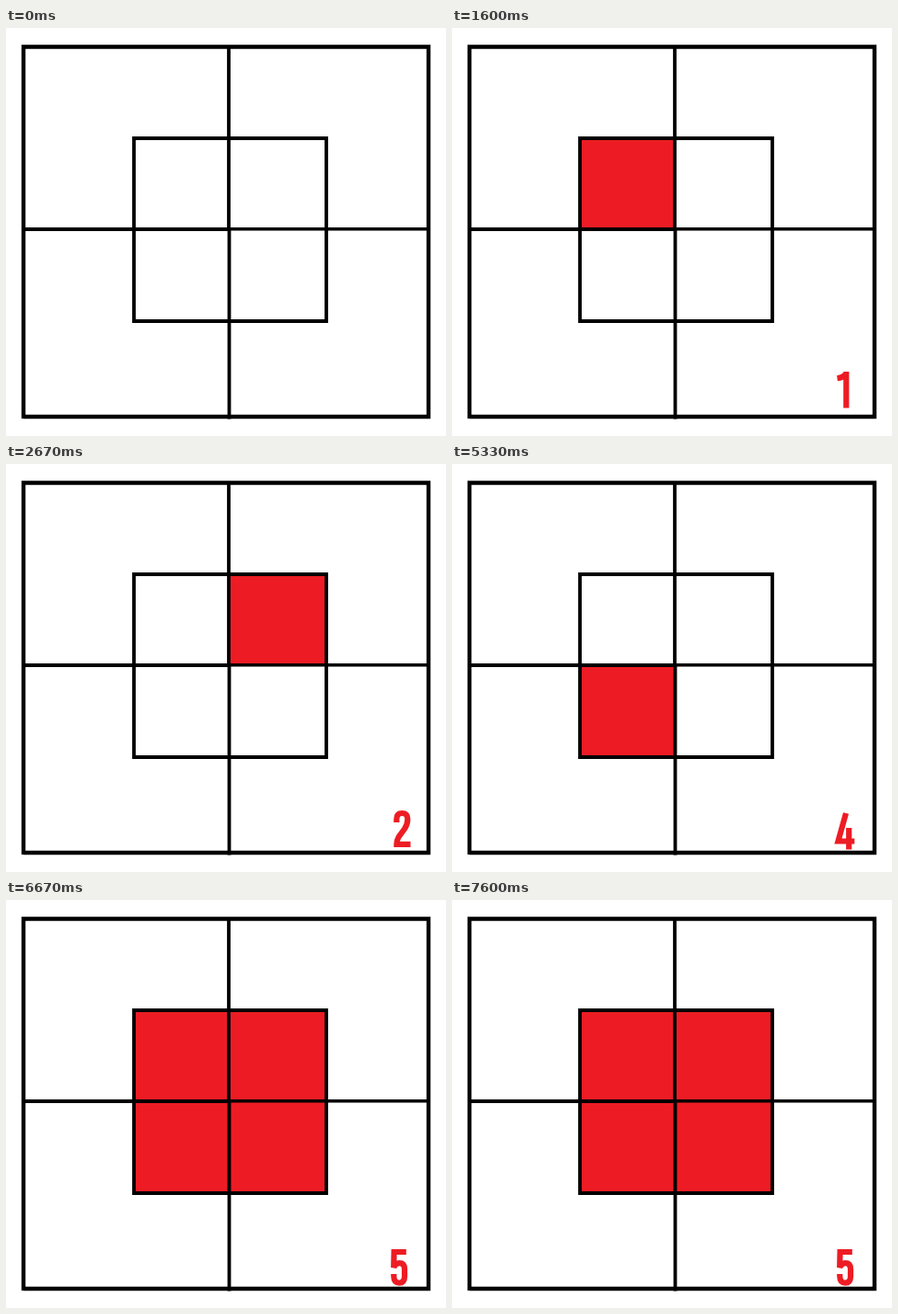
An HTML page that plays this animation: 478x444 px, repeating every 8 s.

```html
<!DOCTYPE html>
<html lang="en">
<head>
<meta charset="utf-8">
<title>Quadrants</title>
<style>
  html, body { margin: 0; width: 100%; height: 100%; overflow: hidden; background: #fff; }
  svg { display: block; width: 478px; height: 444px; }
  .line { fill: none; stroke: #000; stroke-width: 4; }
  .cell { fill: #ed1c24; }
  #digit { fill: none; stroke: #ed1c24; stroke-width: 6.2; }
</style>
</head>
<body>
<svg viewBox="0 0 478 444" role="img">
  <g id="cells"></g>
  <g class="line">
    <path d="M19 425V20.5H459V423H19" stroke-width="4.4"/>
    <path d="M242 20V219" stroke-width="3.8"/>
    <path d="M242.5 219V425.5" stroke-width="3.8"/>
    <path d="M19 219H242" stroke-width="4.2"/>
    <path d="M242 218.8H459" stroke-width="3.6"/>
    <path d="M139 120H348V319H139Z" stroke-width="3.8"/>
  </g>
  <path id="digit"/>
</svg>
<script>
const LOOP = 8000;
const svg = document.querySelector('svg');
const digit = document.getElementById('digit');

// Condensed numerals drawn as strokes, clockwise cells starting top left.
const steps = [
  { at: 0, label: '', lit: [], glyph: '' },
  { at: 1330, label: '1', lit: [0],
    glyph: 'M428.3 413.5V374M428.5 376.5Q424.5 380.5 418.5 381.3' },
  { at: 2670, label: '2', lit: [1],
    glyph: 'M424.3 390V386.5Q424.3 380 430.3 380T436.3 386.5Q436.3 392 433 397L426.5 406Q424.4 409.5 424.4 413.8H439.5' },
  { at: 4070, label: '3', lit: [2],
    glyph: 'M425.3 389.5V387Q425.3 381 431 381T436.7 387V390.5Q436.7 396.7 431 396.7H428.5M431 396.7Q437 396.7 437 403V408.5Q437 415 431 415T425.3 408.5V405.5' },
  { at: 5330, label: '4', lit: [3],
    glyph: 'M428 380L419.5 410.5H437.3M431.2 396V419.5' },
  { at: 6670, label: '5', lit: [0, 1, 2, 3],
    glyph: 'M434.8 383H421.6L421.2 400Q422.8 395.2 427.4 395.2Q433 395.2 433 402V409.5Q433 416.7 427.2 416.7T421.3 409.5V407' }
];

const cells = [[139, 120], [242, 120], [242, 219], [139, 219]].map(([x, y]) => {
  const rect = document.createElementNS('http://www.w3.org/2000/svg', 'rect');
  const size = { x, y, width: x === 139 ? 103 : 106, height: y === 120 ? 99 : 100 };
  for (const key in size) rect.setAttribute(key, size[key]);
  rect.setAttribute('class', 'cell');
  return document.getElementById('cells').appendChild(rect);
});

function render(time) {
  const step = steps.filter(s => s.at <= time).pop();
  cells.forEach((cell, i) => {
    cell.style.visibility = step.lit.includes(i) ? 'visible' : 'hidden';
  });
  digit.setAttribute('d', step.glyph);
  svg.setAttribute('aria-label', 'Divided square ' + step.label);
}

const start = performance.now();
function tick() {
  render((performance.now() - start) % LOOP);
  requestAnimationFrame(tick);
}
tick();
</script>
</body>
</html>
```
